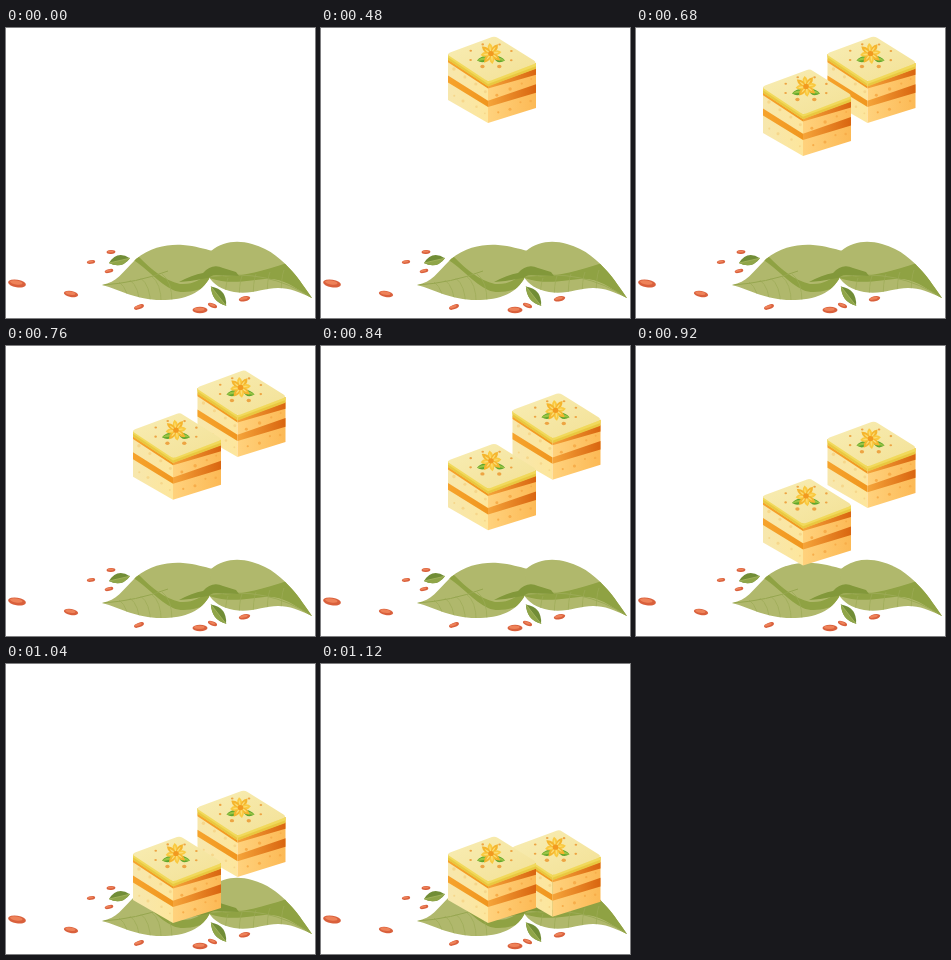
Recreate the animation shown at these times as an HTML page. Size 309 by 290 pixels, loop 6 s.

```html
<!DOCTYPE html>
<html lang="en">
<head>
<meta charset="utf-8">
<title>Falling cakes</title>
<style>
  html, body { margin: 0; width: 100%; height: 100%; overflow: hidden; background: #fff; }
  svg { display: block; width: 100%; height: 100%; }
</style>
</head>
<body>
<svg viewBox="0 0 309 290" xmlns="http://www.w3.org/2000/svg">
  <defs>
    <linearGradient id="topFace" x2="1" y2="1">
      <stop stop-color="#f8edb4"/><stop offset="1" stop-color="#f3e196"/>
    </linearGradient>
    <linearGradient id="leftFace">
      <stop stop-color="#f7e7ad"/><stop offset="1" stop-color="#fde69c"/>
    </linearGradient>
    <linearGradient id="rightFace">
      <stop stop-color="#ffd27d"/><stop offset="1" stop-color="#fcb955"/>
    </linearGradient>
    <linearGradient id="jam">
      <stop stop-color="#f6a32c"/><stop offset="1" stop-color="#f0961f"/>
    </linearGradient>
    <linearGradient id="jamShade">
      <stop stop-color="#f5a53a"/><stop offset="1" stop-color="#d96510"/>
    </linearGradient>
    <clipPath id="leftLeaf"><path d="M96 257C111 254 116 245 130 231C145 219 162 216 177 217C190 218 198 221 207 223L204 249C196 265 180 272 155 272C130 272 115 262 96 257Z"/></clipPath>
    <clipPath id="rightLeaf"><path d="M203 249L205 223C217 213 232 212 246 216C265 221 277 233 286 243C294 252 299 260 306 270C293 264 284 260 272 260C258 260 245 267 228 264C216 262 207 256 203 249Z"/></clipPath>
    <g id="cake"></g>
  </defs>

  <g clip-path="url(#leftLeaf)">
    <path fill="#b0b86c" d="M90 210H210V276H90Z"/>
    <path fill="#8fa243" d="M126 231L133 229C146 242 158 252 174 256C187 257 195 251 206 244V256C194 262 178 267 167 262C152 255 141 240 126 231Z"/>
    <path fill="none" stroke="#96a64f" d="M96 257Q130 255 162 243"/>
    <g id="leftVeins"></g>
  </g>
  <g clip-path="url(#rightLeaf)">
    <path fill="#b0b86c" d="M198 208H310V275H198Z"/>
    <path fill="#8fa243" d="M202 246C224 252 250 245 281 235L310 274C290 260 279 251 263 251C244 251 227 258 203 250Z"/>
    <path fill="none" stroke="#9cab56" d="M203 249Q262 240 306 270"/>
    <g id="rightVeins"></g>
  </g>
  <path fill="#82983a" d="M173 254Q186 247 197 245Q206 235 217 240L230 244L233 248L207 247L202 250Q187 253 173 254Z"/>
  <g id="scraps"></g>

  <use id="backCake" href="#cake"/>
  <use id="frontCake" href="#cake"/>
</svg>
<script>
const LOOP = 6000, FALL = 520, DROP = 164, STEP = 40;
const $ = id => document.getElementById(id);
const mix = (a, b, t) => a + (b - a) * t;

let seed = 7;
const random = () => (seed = seed * 16807 % 2147483647) / 2147483647;

function add(parent, tag, attrs) {
  const node = document.createElementNS('http://www.w3.org/2000/svg', tag);
  for (const key in attrs) node.setAttribute(key, attrs[key]);
  parent.append(node);
  return node;
}
const path = (parent, d, fill) => add(parent, 'path', { d, fill });
const dot = (parent, cx, cy, rx, ry, fill) => add(parent, 'ellipse', { cx, cy, rx, ry, fill });
const group = (parent, x, y, angle = 0) =>
  add(parent, 'g', { transform: `translate(${x} ${y}) rotate(${angle})` });

// Vertical cake edges; depth 0 is the top and 1 the base.
const EDGES = {
  left: { x: 127, top: 190, base: 236 },
  front: { x: 167, top: 217, base: 259 },
  right: { x: 215, top: 199, base: 244 }
};
const at = ({ x, top, base }, depth) => `${x} ${mix(top, base, depth)}`;

function band(a, b, from, to, fill, flare = 0) {
  path($('cake'), `M${at(a, from)}L${at(b, from)}L${at(b, to + flare)}L${at(a, to)}Z`, fill);
}

function holes(a, b, depth, fill) {
  for (let u = .12; u < 1; u += .25) {
    const v = depth + (random() - .5) * .14, size = .8 + random();
    dot($('cake'), mix(a.x, b.x, u + random() * .1),
      mix(mix(a.top, b.top, u), mix(a.base, b.base, u), v), size, size, fill);
  }
}

function drawSide(a, b, sponge, jam, hole, flare) {
  band(a, b, 0, 1, sponge);
  band(a, b, .12, .18, jam, flare);
  band(a, b, .47, .62, jam, flare / 2);
  band(a, b, 0, .13, '#e9c840');
  band(a, b, 0, .07, '#f1d95a');
  for (const depth of [.33, .8]) holes(a, b, depth, hole);
}

function drawFlower() {
  const flower = group($('cake'), 170, 189.5);
  for (const side of [-1, 1]) {
    const leaf = add(flower, 'g', { transform: `scale(${side} 1)` });
    path(leaf, 'M2 3Q9 1 14 7Q6 12 2 3Z', '#5fa62c');
    path(leaf, 'M3 4Q9 3 14 7Q8 8 3 4Z', '#9cc544');
  }
  for (let i = 0; i < 8; i++) {
    const petal = group(flower, 0, 0, i * 45 - 8);
    const length = 10.5 + i % 2;
    path(petal, `M0 0Q-5 -6 0 ${-length}Q5 -6 0 0Z`, i % 2 ? '#f5b52d' : '#fac93f');
    path(petal, 'M0 0Q-2 -5 0 -8Q1 -5 0 0Z', '#fbdc73');
  }
  dot(flower, 0, 0, 2.8, 2.6, '#f29a20');
}

function drawCake() {
  const { left, front, right } = EDGES;
  drawSide(left, front, 'url(#leftFace)', 'url(#jam)', '#f6d68a', 0);
  drawSide(front, right, 'url(#rightFace)', 'url(#jamShade)', '#f7ad4a', .08);
  path($('cake'), 'M127 191Q127 189 129 188.500L171 173Q174 172 177 174L213 196.500Q216 198.500 213 200L170 216.500Q167 217.500 164 215.500Z', 'url(#topFace)');
  for (let i = 0; i < 8; i++) {
    const a = i * Math.PI / 4 + .4;
    const size = 1.3 + Math.max(0, Math.sin(a) - .8) * 7;
    dot($('cake'), 170 + 22 * Math.cos(a), 191.5 + 12 * Math.sin(a), size, size * .8, '#eda443');
  }
  drawFlower();
}

function drawVeins(parent, startX, endX, y, lean) {
  for (let i = 0; i < 5; i++) {
    const x = mix(startX, endX, i / 4);
    add(parent, 'path', {
      d: `M${x} ${y - i * 2}q${lean} 7 ${lean} 28`,
      fill: 'none', stroke: '#9cab56', 'stroke-width': .7
    });
  }
}

function drawSmallLeaf(x, y, length, angle) {
  const leaf = group($('scraps'), x, y, angle);
  path(leaf, `M0 0Q${length / 2} -11 ${length} 0Q${length / 2} 9 0 0Z`, '#718d36');
  path(leaf, `M0 0Q${length / 2} 9 ${length} 0Z`, '#8fa548');
  add(leaf, 'path', { d: `M0 0H${length}`, stroke: '#a9b864', 'stroke-width': .7 });
}

function drawSeed(x, y, size, angle) {
  const grain = group($('scraps'), x, y, angle);
  dot(grain, 0, 0, size, size * .43, '#d9603c');
  dot(grain, -size * .1, -size * .1, size * .7, size * .22, '#ee8259');
}

// cubic-bezier(.42, 0, 1, 1)
function easeIn(x) {
  if (x >= 1) return 1;
  let low = 0, high = 1;
  for (let i = 0; i < 24; i++) {
    const s = (low + high) / 2;
    const bx = 1.26 * s * (1 - s) ** 2 + 3 * s * s * (1 - s) + s ** 3;
    if (bx < x) low = s; else high = s;
  }
  return low * low * (3 - 2 * low);
}

function place(cake, time, start, x, y) {
  const lift = DROP * (1 - easeIn(Math.max(0, time - start) / FALL));
  cake.setAttribute('visibility', time >= start ? 'visible' : 'hidden');
  cake.setAttribute('transform', `translate(${x} ${y - lift})`);
}

function draw(now) {
  const time = Math.floor(now % LOOP / STEP) * STEP;
  place($('frontCake'), time, 480, 0, 0);
  place($('backCake'), time, 600, 64.5, -6.3);
}

drawCake();
drawVeins($('leftVeins'), 113, 156, 254, 10);
drawVeins($('rightVeins'), 222, 278, 250, -3);
drawSmallLeaf(103, 235, 21.5, -13);
drawSmallLeaf(205, 258.5, 24.5, 52);
drawSeed(11, 255.5, 9, 9);
drawSeed(65, 266, 7.2, 9);
drawSeed(85, 234, 4.2, -8);
drawSeed(105, 224, 4.4, -3);
drawSeed(103, 243, 4.4, -14);
drawSeed(133, 279, 5.2, -20);
drawSeed(194, 282, 7.5, 0);
drawSeed(206.5, 277.5, 4.8, 20);
drawSeed(238.5, 270.8, 5.8, -12);

let origin;
function tick(now) {
  origin ??= now;
  draw(now - origin);
  requestAnimationFrame(tick);
}
draw(0);
requestAnimationFrame(tick);
</script>
</body>
</html>
```
